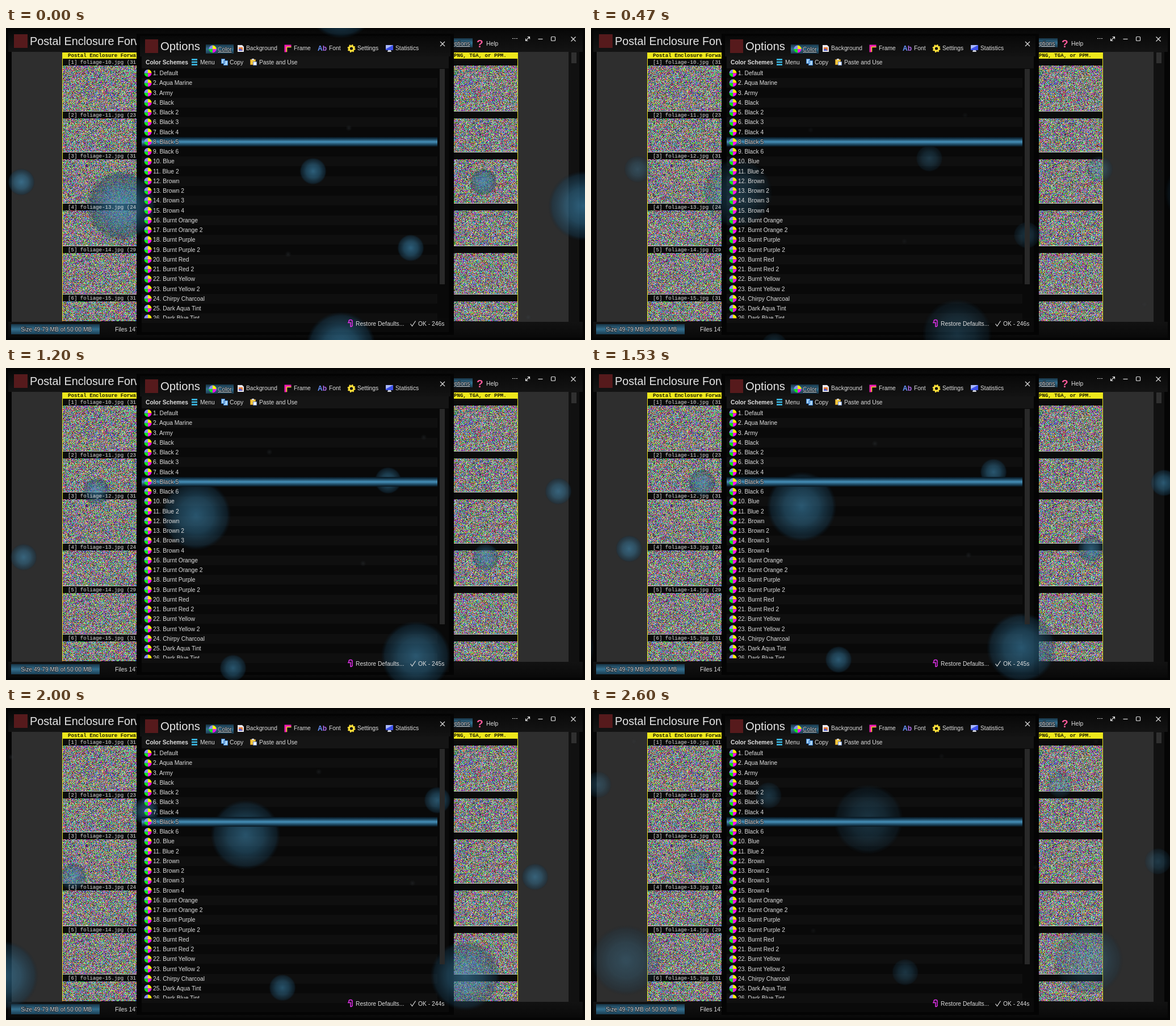
These frames come from a looping animation (1020x549 px, 2.67 s). An HTML page with a canvas:

```html
<!DOCTYPE html>
<html lang="en">
<head>
<meta charset="utf-8">
<title>Options</title>
<style>
html, body { margin: 0; width: 100%; height: 100%; overflow: hidden; background: #050505; }
canvas, svg { position: absolute; left: 0; top: 0; width: 1020px; height: 549px; }
text { font: 10.3px "Liberation Sans", Arial, sans-serif; fill: #dedede; white-space: pre; }
.big { font-size: 19.8px; fill: #e6e6e6; }
.bold { font-weight: bold; }
.mono { font: 9.1px "Liberation Mono", "Courier New", monospace; }
.dark { fill: #1c1a00; font-weight: bold; }
.line { fill: none; stroke: #dedede; stroke-width: 1.2; }
.shade { paint-order: stroke; stroke: #0a1620; stroke-width: 1.4px; }
</style>
</head>
<body>
<canvas id="back" width="1020" height="549"></canvas>
<canvas id="glow" width="1020" height="549"></canvas>
<svg viewBox="0 0 1020 549">
  <defs>
    <clipPath id="left"><path d="M0 0H230V549H0z"/></clipPath>
    <clipPath id="right"><path d="M789 0H1020V549H789z"/></clipPath>
    <clipPath id="list"><path d="M239 71H761V511H239z"/></clipPath>
    <linearGradient id="bar" x2="0" y2="1">
      <stop offset="0" stop-color="#06121a"/>
      <stop offset=".2" stop-color="#173a50"/>
      <stop offset=".5" stop-color="#4690b9"/>
      <stop offset=".8" stop-color="#1b435b"/>
      <stop offset="1" stop-color="#06121a"/>
    </linearGradient>
    <linearGradient id="tab" x2="0" y2="1">
      <stop offset="0" stop-color="#173446"/>
      <stop offset=".5" stop-color="#35708f"/>
      <stop offset="1" stop-color="#1a3d52"/>
    </linearGradient>
    <g id="pie">
      <path d="M0 0V-6.5A6.5 6.5 0 0 1 6.5 0z" fill="#fff200"/>
      <path d="M0 0H6.5A6.5 6.5 0 0 1 0 6.5z" fill="#ff10f0"/>
      <path d="M0 0V6.5A6.5 6.5 0 0 1-6.5 0z" fill="#10e820"/>
      <path d="M0 0H-6.5A6.5 6.5 0 0 1 0-6.5z" fill="#8a8cff"/>
    </g>
  </defs>

  <g clip-path="url(#left)">
    <rect x="14" y="11" width="24" height="24" fill="#561a1c"/>
    <text class="big" x="42" y="30">Postal Enclosure Forwarder</text>
    <text class="mono dark" x="109" y="51">Postal Enclosure Forwarder</text>
    <g id="files"></g>
    <rect x="9" y="521" width="156" height="18" fill="url(#tab)"/>
    <text class="shade" x="26" y="534">Size 49.79 MB of 50.00 MB</text>
    <text x="192" y="534">Files 147</text>
  </g>

  <g clip-path="url(#right)">
    <text class="mono dark" x="789" y="51">PNG, TGA, or PPM.</text>
    <rect x="760" y="18" width="62" height="16" fill="url(#tab)"/>
    <text class="shade" x="782" y="31" text-decoration="underline">Options</text>
    <text class="bold" x="829" y="34" style="font-size:19px;fill:#ff5a9c">?</text>
    <text x="846" y="31">Help</text>
    <path d="M892 18.5h2m1.500 0h2m1.500 0h2" class="line" stroke-width="2"/>
    <path d="M916 22l6-6M918.500 15.500h4v4M915.500 18.500v4h4" class="line"/>
    <path d="M937.500 19.500h8" class="line"/>
    <rect x="960.500" y="15.500" width="7" height="7" rx="1" class="line"/>
    <path d="M995.500 15.500l8 8m0-8l-8 8" class="line"/>
    <rect x="996" y="43" width="9" height="19" fill="#303030"/>
  </g>

  <rect x="245" y="20" width="23" height="24" fill="#561a1c"/>
  <text class="big" x="272" y="39" style="font-size:20.3px">Options</text>
  <path d="M765 24l8 8m0-8l-8 8" class="line"/>

  <rect x="352" y="29" width="49" height="16" fill="url(#tab)"/>
  <use href="#pie" x="364" y="37"/>
  <text class="shade" x="373" y="41" text-decoration="underline">Color</text>
  <path d="M408 30h8l3 3v9h-11z" fill="#e8e8f0"/>
  <path d="M410 34h7v6h-7z" fill="#e8762c"/>
  <path d="M410 38l3-2 4 4h-7z" fill="#4a5ad0"/>
  <text x="423" y="39">Background</text>
  <path d="M490.500 29.500h12v4h-8v9h-4z" fill="#f01cb4"/>
  <path d="M494.500 42v-8.500h8" fill="none" stroke="#f3d42a" stroke-width="1.500"/>
  <text x="507" y="39">Frame</text>
  <text class="bold" x="549" y="40" style="font-size:12px"><tspan fill="#6a96ff">A</tspan><tspan fill="#b06cf0">b</tspan></text>
  <text x="569" y="39">Font</text>
  <circle cx="608.500" cy="36" r="4.200" fill="none" stroke="#ffe13a" stroke-width="3.200"/>
  <circle cx="608.500" cy="36" r="6" fill="none" stroke="#ffe13a" stroke-width="2" stroke-dasharray="2.350 2.350"/>
  <text x="619" y="39">Settings</text>
  <path d="M669 30h13v9h-13z" fill="#3c50e8"/>
  <path d="M669 30h13l-13 7z" fill="#a9b8ff"/>
  <path d="M673 39h5l1 3h-7z" fill="#ccd0dc"/>
  <text x="686" y="39">Statistics</text>

  <text class="bold" x="246" y="64">Color Schemes</text>
  <path d="M327 55.500h10m-10 4.500h10m-10 4.500h10" stroke="#3fc4f2" stroke-width="2.300"/>
  <text x="342" y="64">Menu</text>
  <path d="M379.500 54.500h6v8h-6zM383.500 57.500h7v8h-7z" fill="#a8d4ff" stroke="#3478c4"/>
  <text x="394" y="64">Copy</text>
  <path d="M430.500 55.500h9v9h-9z" fill="#f4c63c" stroke="#b48320"/>
  <path d="M433 54h4v2.500h-4z" fill="#d8d8d8"/>
  <path d="M435.500 59.500h6v6h-6z" fill="#f0f4ff" stroke="#6a86c0"/>
  <text x="446" y="64">Paste and Use</text>

  <g id="rows" clip-path="url(#list)"></g>
  <rect x="764" y="72" width="9" height="379" fill="#292929"/>

  <path d="M604 518v-2a3 2.500 0 0 1 6 0v6M607 525.500a3 2.500 0 0 0 3-3.500M602 518.500h6M607 519v7" fill="none" stroke="#e030e8" stroke-width="1.500"/>
  <text x="616" y="524">Restore Defaults...</text>
  <path d="M712.500 520.500l3 4 6-9" class="line" stroke-width="1.500"/>
  <text id="ok" x="726" y="524">OK - 246s</text>
</svg>

<script>
const $ = id => document.getElementById(id);
const W = 1020, H = 549, LOOP = 2670;

// Static window, noise pictures and dialog
const bg = $('back').getContext('2d');
const box = (color, x, y, w, h) => { bg.fillStyle = color; bg.fillRect(x, y, w, h); };
const fade = (y0, y1, a, b) => {
  const g = bg.createLinearGradient(0, y0, 0, y1);
  g.addColorStop(0, a);
  g.addColorStop(1, b);
  return g;
};
let seed = 7319;
const rand = () => {
  seed = (Math.imul(seed, 1664525) + 1013904223) >>> 0;
  return seed / 4294967296;
};
const noise = (x, y, w, h) => {
  const img = bg.createImageData(w, h);
  for (let i = 0; i < img.data.length; i++) img.data[i] = i % 4 === 3 ? 255 : rand() * 256;
  bg.putImageData(img, x, y);
};

box('#050505', 0, 0, W, H);
box(fade(4, 42, '#080808', '#141414'), 4, 4, 1012, 38);
box(fade(517, 545, '#121212', '#090909'), 4, 517, 1012, 28);
box('#2e2e2e', 10, 42, 981, 475);
box('#111', 991, 42, 19, 475);
box('#0c0c0c', 99, 42, 803, 475);
box('#eee81c', 99, 43, 803, 11);

const pics = [[66, 147], [159, 219], [231, 309], [321, 384], [396, 469], [481, 516]];
const sizes = [31, 23, 31, 24, 29, 31];
let names = '';
pics.forEach(([top, end], i) => {
  noise(100, top, 801, end - top);
  if (end < 516) box('#c8c8c8', 100, end - 1, 801, 1);
  names += `<text class="mono" x="109" y="${top - 3}">[${i + 1}] foliage-${10 + i}.jpg (${sizes[i]}</text>`;
});
$('files').innerHTML = names;
box('#e6e01c', 99, 43, 1, 473);
box('#e6e01c', 901, 43, 1, 473);

box('#040404', 230, 10, 559, 530);
box(fade(14, 50, '#080808', '#131313'), 236, 14, 547, 36);
box('#151515', 239, 50, 541, 21);
box('#090909', 239, 71, 541, 440);
box('#0a0a0a', 239, 511, 541, 24);

// Scheme list
const schemes = ['Default', 'Aqua Marine', 'Army', 'Black', 'Black 2', 'Black 3', 'Black 4',
  'Black 5', 'Black 6', 'Blue', 'Blue 2', 'Brown', 'Brown 2', 'Brown 3', 'Brown 4',
  'Burnt Orange', 'Burnt Orange 2', 'Burnt Purple', 'Burnt Purple 2', 'Burnt Red', 'Burnt Red 2',
  'Burnt Yellow', 'Burnt Yellow 2', 'Chirpy Charcoal', 'Dark Aqua Tint', 'Dark Blue Tint'];
const pitch = 17.25, chosen = 7;
$('rows').innerHTML = schemes.map((name, i) => {
  const y = 71 + i * pitch, on = i === chosen;
  if (i % 2) box('#0f0f0f', 239, Math.round(y), 521, 17);
  return (on ? `<rect x="239" y="${y}" width="521" height="17" fill="url(#bar)"/>` : '') +
    `<use href="#pie" x="250" y="${y + 8.5}"/>` +
    `<text x="259" y="${Math.round(y + 12)}"${on ? ' class="shade"' : ''}>${i + 1}. ${name}</text>`;
}).join('');

// Drifting bubbles, repeated on a tile
const ctx = $('glow').getContext('2d');
const tileW = 814, tileH = 604;
const bubbles = [
  [541, 252, 24], [27, 271, 24], [713, 387, 24], [268, 582, 24],
  [203, 313, 62], [590, 561, 62],
  [604, 176, 6], [497, 398, 6], [332, 202, 6], [106, 509, 6]
];
const drift = [[0, 0], [7, 55], [12, 88], [18, 132], [27, 197], [33, 241], [40, 293]];
const power = [[0, 1], [7, .5], [12, .72], [18, .88], [27, .92], [33, .78], [40, .46]];
const along = (points, s) => {
  const k = points.findIndex(p => p[0] > s);
  const [a, u] = points[k - 1], [b, v] = points[k];
  return u + (v - u) * (s - a) / (b - a);
};

const bubble = (x, y, r, p) => {
  if (x < -r || x > W + r || y < -r || y > H + r) return;
  const g = ctx.createRadialGradient(x, y, 0, x, y, r);
  if (r < 10) {
    g.addColorStop(0, `rgba(70,78,84,${.3 * p})`);
    g.addColorStop(1, 'rgba(50,56,60,0)');
  } else {
    g.addColorStop(0, `rgba(64,140,182,${.66 * p})`);
    g.addColorStop(.5, `rgba(48,112,148,${.56 * p})`);
    g.addColorStop(.88, `rgba(24,62,86,${.42 * p})`);
    g.addColorStop(1, 'rgba(12,34,50,0)');
  }
  ctx.fillStyle = g;
  ctx.beginPath();
  ctx.arc(x, y, r, 0, 2 * Math.PI);
  ctx.fill();
};

// The picture advances 15 times a second, on whole hundredths
const stepAt = t => {
  let i = Math.floor(t * .015) + 1;
  while (Math.round(i * 20 / 3) * 10 > t) i--;
  return i;
};

let last = -1;
const draw = s => {
  const dx = along(drift, s), dy = -.41 * dx, p = along(power, s);
  ctx.clearRect(0, 0, W, H);
  for (const [x, y, r] of bubbles)
    for (const i of [-1, 0, 1])
      for (const j of [-1, 0])
        bubble(x + dx + i * tileW, y + dy + j * tileH, r, p);
  $('ok').textContent = `OK - ${s < 10 ? 246 : s < 25 ? 245 : 244}s`;
};
const tick = () => {
  const s = stepAt(performance.now() % LOOP);
  if (s !== last) draw(last = s);
  requestAnimationFrame(tick);
};
tick();
</script>
</body>
</html>
```
